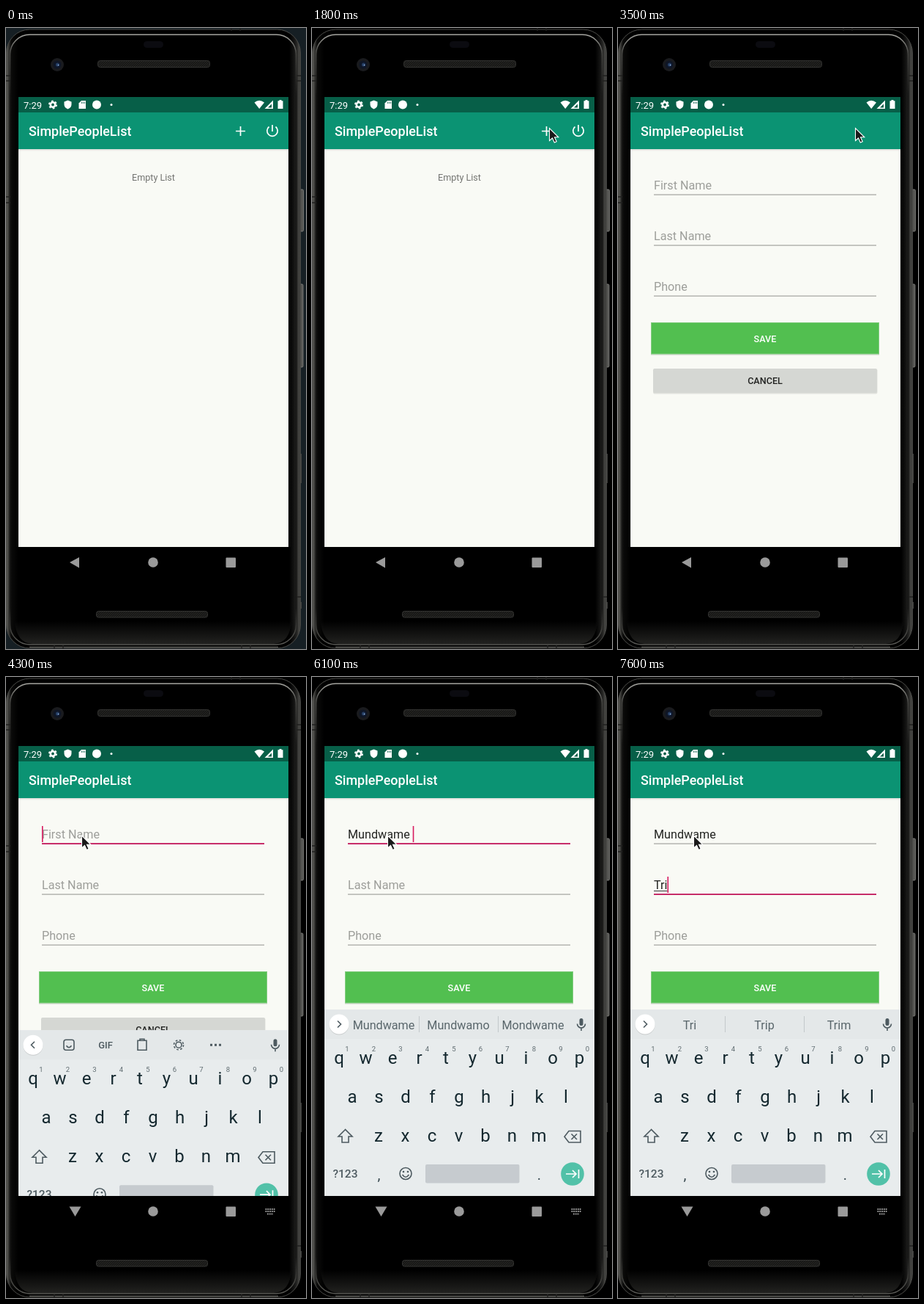
Recreate the animation shown at these times as an HTML page. Size 410 by 846 pixels, loop 8000 ms.

```html
<!DOCTYPE html>
<html lang="en">
<head>
<meta charset="utf-8">
<title>Contact form on a phone</title>
<style>
html, body { margin: 0; width: 410px; height: 846px; overflow: hidden; background: #000; }
svg { display: block; font-family: Roboto, sans-serif; }
text { white-space: pre; }
.mid { text-anchor: middle; }
.field { font-size: 16.16px; fill: #222321; }
.hint { fill: #9d9e9a; }
.line { fill: none; stroke: #fff; stroke-width: 1.7; }
.key { fill: none; stroke: #4d5a60; stroke-width: 1.6; }
</style>
</head>
<body>
<svg width="410" height="846" viewBox="0 0 410 846">
  <defs>
    <linearGradient id="side">
      <stop offset="0" stop-color="#62625e"/><stop offset=".008" stop-color="#383835"/>
      <stop offset=".016" stop-color="#0b0b0a"/><stop offset=".04" stop-color="#000"/>
      <stop offset=".962" stop-color="#000"/><stop offset=".978" stop-color="#141413"/>
      <stop offset=".988" stop-color="#282826"/><stop offset=".996" stop-color="#4b4b48"/>
      <stop offset="1" stop-color="#20201f"/>
    </linearGradient>
    <linearGradient id="rim" x2="0" y2="1">
      <stop offset="0" stop-color="#a5a5a0"/><stop offset=".03" stop-color="#454542"/>
      <stop offset=".1" stop-color="#141413"/><stop offset=".94" stop-color="#141413"/>
      <stop offset="1" stop-color="#5a5a56"/>
    </linearGradient>
    <linearGradient id="shade" x2="0" y2="1">
      <stop offset="0" stop-opacity=".12"/><stop offset="1" stop-opacity="0"/>
    </linearGradient>
    <linearGradient id="glow" x2="0" y2="1">
      <stop offset="0" stop-color="#222220" stop-opacity="0"/><stop offset="1" stop-color="#222220"/>
    </linearGradient>
    <pattern id="mesh" width="3" height="3" patternUnits="userSpaceOnUse">
      <rect width="3" height="3" fill="#171716"/><path d="M0 3L3 0" stroke="#2c2c2a" stroke-width=".8"/>
    </pattern>
    <clipPath id="screen"><rect x="17" y="94" width="369" height="656"/></clipPath>
    <clipPath id="page"><rect x="17" y="94" width="369" height="613"/></clipPath>
    <g id="base">
      <rect x="17" y="94" width="369" height="656"/>
      <rect x="17" y="94" width="369" height="613" fill="#f9faf5"/>
      <rect x="17" y="165" width="369" height="3" fill="url(#shade)"/>
      <rect x="17" y="94" width="369" height="21" fill="#075f48"/>
      <rect x="17" y="115" width="369" height="50" fill="#0b9373"/>
      <text x="31" y="147" font-size="17.96" font-weight="500" fill="#fff">SimplePeopleList</text>
    </g>
  </defs>

  <!-- phone body -->
  <rect id="desk" width="410" height="846"/>
  <g fill="#555552" stroke="#8a8a86" stroke-width=".8">
    <rect x="400" y="220" width="6.5" height="57" rx="1.5"/>
    <rect x="400" y="349" width="6" height="113" rx="1.5"/>
  </g>
  <path d="M403.500 580V620M403.500 782V791" stroke="#454542"/>
  <rect x=".5" y="2" width="402" height="843" rx="32" fill="url(#side)" stroke="#4b4b48"/>
  <path d="M12 808H390Q388 838 366 839H36Q14 838 12 808Z" fill="url(#glow)"/>
  <rect x="5.500" y="9" width="391" height="831" rx="27" fill="none" stroke="url(#rim)" stroke-width="1.500"/>
  <path d="M32 843.500H372" stroke="#5d5d59" stroke-width="1.500"/>
  <path d="M0 65H6M0 72H6M0 230H6M0 238H6M397 65H403M397 72H403M397 775H403M308 0V4M320 0V4M66 841V846M78 841V846M322 841V846M334 841V846" stroke="#20201f" stroke-width="1.500"/>
  <rect x="188" y="18" width="27" height="9" rx="4.500" fill="#0b0b10"/>
  <circle cx="70" cy="50" r="9" fill="#1a1b1e"/><circle cx="70" cy="50" r="5.500" fill="#0f1626"/>
  <circle cx="70.500" cy="50" r="2.500" fill="#263f66"/><circle cx="71.500" cy="50.500" r=".8" fill="#a9c4e8"/>
  <g fill="url(#mesh)" stroke="#333331">
    <rect x="125.500" y="44.500" width="153" height="9" rx="3"/>
    <rect x="123.500" y="794.500" width="152" height="8.500" rx="3"/>
  </g>

  <g clip-path="url(#screen)">
    <g id="list">
      <use href="#base"/>
      <circle id="ripple" cx="320.500" cy="140" fill="#fff" fill-opacity=".21"/>
      <path class="line" d="M314 140.500H327M320.500 134V147"/>
      <path class="line" d="M364 132V141M359.500 134.500A7.200 7.200 0 1 0 368.500 134.500"/>
      <text class="mid" x="201.500" y="208" font-size="12.600" fill="#737471">Empty List</text>
    </g>
    <g id="form">
      <use href="#base"/>
      <g id="fields"></g>
      <rect x="45" y="402" width="312" height="44" fill="#000" opacity=".1"/>
      <rect x="45.500" y="401.500" width="311" height="42.500" fill="#52bf50" stroke="#7fcb7d"/>
      <rect x="48" y="464.500" width="306.500" height="34" rx="2" fill="#000" opacity=".1"/>
      <rect x="48" y="464" width="306" height="33" rx="2" fill="#d5d7d3"/>
      <g class="mid" font-size="12.600" font-weight="500">
        <text x="201" y="427.500" fill="#fff">SAVE</text>
        <text x="201" y="485" fill="#232422">CANCEL</text>
      </g>
    </g>
  </g>

  <g clip-path="url(#page)">
    <g id="keyboard">
      <rect x="17" y="453" width="369" height="254" fill="#e8eced"/>
      <rect x="17" y="453" width="369" height="40" fill="#e4e8e9"/>
      <circle cx="37" cy="474" r="13.500" fill="#000" opacity=".12"/>
      <circle cx="37" cy="473" r="13.500" fill="#fff"/>
      <path id="chevron" d="M35 468.500L39.500 473L35 477.500" class="key"/>
      <g id="words" class="mid" font-size="16.160" fill="#59666b">
        <path d="M146.500 462V484M254.500 462V484" stroke="#c3c9cb"/>
        <text x="98" y="479.500"></text><text x="200" y="479.500"></text><text x="302" y="479.500"></text>
      </g>
      <g id="tools" class="key">
        <rect x="79" y="466" width="14" height="14" rx="3"/><path d="M82.500 474Q86 479 89.500 474"/>
        <text class="mid" x="136" y="478" font-size="13" font-weight="500" fill="#4d5a60" stroke="none">GIF</text>
        <path d="M180 467H192V480H180ZM183 467V465H189V467"/>
        <circle cx="236" cy="473" r="4"/><circle cx="236" cy="473" r="6.500" stroke-dasharray="2.600 2.505"/>
        <path d="M279 473H282M285 473H288M291 473H294" stroke-width="3"/>
      </g>
      <rect x="365.500" y="465" width="5" height="10" rx="2.500" fill="#4d5a60"/>
      <path class="key" d="M362.500 472.500A5.500 5.500 0 0 0 373.500 472.500M368 478V482"/>
      <g id="keys" class="mid" fill="#14282f"></g>
      <path class="key" d="M45.500 616.500L36 626H41V634H50V626H55Z"/>
      <path class="key" d="M351 618.500H367V634H351L345 626.200ZM354.500 622.500L362 630M362 622.500L354.500 630"/>
      <g class="mid" fill="#37474f">
        <text x="45.500" y="682" font-size="15.500" font-weight="500" fill="#4d5a60">?123</text>
        <text x="91.500" y="685" font-size="20">,</text><text x="310.500" y="685" font-size="20">.</text>
      </g>
      <circle class="key" cx="128" cy="676.500" r="8"/><path class="key" d="M123.500 678Q128 684.500 132.500 678"/>
      <circle cx="125" cy="674" r="1.300" fill="#4d5a60"/><circle cx="131" cy="674" r="1.300" fill="#4d5a60"/>
      <rect x="155" y="664" width="128.500" height="25.500" rx="2" fill="#c6cbcf"/>
      <circle cx="356" cy="677" r="15.800" fill="#51c1a8"/>
      <path class="line" d="M347 677H361M356 672L361 677L356 682M364.500 671V683"/>
    </g>
  </g>

  <!-- status icons -->
  <g fill="#fff">
    <text x="24" y="109.500" font-size="13">7:29</text>
    <circle cx="64" cy="104.500" r="3.200" fill="none" stroke="#fff" stroke-width="2.600"/>
    <circle cx="64" cy="104.500" r="5" fill="none" stroke="#fff" stroke-width="2" stroke-dasharray="2.600 2.636"/>
    <path d="M84.500 98.500L89.500 100.500V104Q89.500 108.500 84.500 110.500Q79.500 108.500 79.500 104V100.500Z"/>
    <path d="M103 99H109V110H99.500V102.500Z"/>
    <path d="M103.500 100.500V103M105.500 100.500V103M107.500 100.500V103" stroke="#075f48" stroke-width=".8"/>
    <circle cx="124" cy="104.500" r="6"/>
    <circle cx="144" cy="104.500" r="1.500"/>
    <path d="M339.500 101.500Q346 96 353 101.500L346.200 110Z"/>
    <path d="M365 98.500V110H353.500Z"/><path d="M363 103.500V108.500H358Z" fill="#075f48"/>
    <path d="M373.500 98H376.500V99.200H378.500V110H371.500V99.200H373.500Z"/>
  </g>
  <!-- navigation buttons -->
  <g fill="#9a9a9a">
    <path id="back" d="M87 728L100 721V735.500Z"/>
    <path id="down" d="M86.500 721.500H102.500L94.500 735Z"/>
    <circle cx="201" cy="728" r="6.800"/>
    <rect x="300.500" y="721.500" width="13.500" height="13.500" rx="1"/>
    <path id="switch" d="M354.500 725H368M354.500 728H368M357 731.500H365.500" stroke="#9a9a9a" stroke-width="1.800" stroke-dasharray="1.800 1"/>
  </g>
  <path id="mouse" d="M0 0V17L4 13.500L6.800 19.500L9.700 18.200L7 12.300H12.300Z" fill="#1a1a1a" stroke="#fff" stroke-width="1.100"/>
</svg>
<script>
const $ = id => document.getElementById(id);
const show = (el, on) => el.style.display = on ? '' : 'none';
const part = (t, from, to) => Math.min(1, Math.max(0, (t - from) / (to - from)));
const smooth = p => p * p * (3 - 2 * p);
const easeOut = p => 1 - (1 - p) ** 4;
const mix = (a, b, p) => a + (b - a) * p;
const zoom = s => `translate(201.5 422) scale(${s}) translate(-201.5 -422)`;

const LOOP = 8000, STEP = 100, NAME = 'Mundwame';

// time, first name, last name, suggestions (empty: toolbar icons)
const typing = [
  [0, '', '', ''],
  [4900, 'M', '', 'M My Maybe'],
  [5100, 'Mu', '', 'M My Maybe'],
  [5200, 'Mu', '', 'Mu Must Much'],
  [5400, 'Mun', '', 'Mu Must Much'],
  [5500, 'Mun', '', `Mun ${NAME} Munch`],
  [5700, 'Mundw', '', `Mundw ${NAME} Mundwamo`],
  [5800, 'Mundwam', '', `Mundwam ${NAME} Mundwamo`],
  [5900, NAME, '', `${NAME} Mundwamo Mondwame`],
  [6100, NAME + ' ', '', `${NAME} Mundwamo Mondwame`],
  [6200, NAME + ' ', '', 'and is the'],
  [6800, NAME + ' ', '', ''],
  [7100, NAME + ' ', 'T', 'T The To'],
  [7300, NAME + ' ', 'Tr', 'Tr Try True'],
  [7600, NAME + ' ', 'Tri', 'Tri Trip Trim']
];

$('fields').innerHTML = ['First Name', 'Last Name', 'Phone'].map((hint, i) => `
  <g transform="translate(49 ${220 + 69 * i})">
    <text class="field hint">${hint}</text><text class="field"></text>
    <rect class="under" y="2" height="1" fill="#333"/>
    <rect class="rule" width="304"/>
    <rect class="caret" y="-17" width="1.6" height="22" fill="#d81b60"/>
  </g>`).join('');

$('keys').innerHTML = [['qwertyuiop', 37, 527], ['asdfghjkl', 55, 579.5], ['zxcvbnm', 91, 632.5]]
  .map(([row, x0, y], r) => [...row].map((c, i) => {
    const x = x0 + 36.5 * i;
    const digit = r ? '' : `<text x="${x + 11}" y="509.5" font-size="9.5" fill="#5f6b70">${(i + 1) % 10}</text>`;
    return `<text x="${x}" y="${y}" font-size="24">${c}</text>` + digit;
  }).join('')).join('');

const fields = [...$('fields').children];
const words = $('words').querySelectorAll('text');

function drawField(box, value, focused, composing, caretOn) {
  const [hint, text, under, rule, caret] = box.children;
  show(hint, !value);
  text.textContent = value;
  const width = value ? text.getComputedTextLength() : 0;
  under.setAttribute('width', composing ? width : 0);
  rule.setAttribute('y', focused ? 6.2 : 6.5);
  rule.setAttribute('height', focused ? 1.8 : 1.2);
  rule.setAttribute('fill', focused ? '#c2185b' : '#a3a49f');
  caret.setAttribute('x', width);
  show(caret, focused && caretOn);
}

function draw(t) {
  const fade = part(t, 0, 900);
  $('desk').setAttribute('fill', `rgb(${[22, 31, 36].map(c => Math.round(c * (1 - fade)))})`);

  // opening the form
  const opening = t >= 3300;
  show($('list'), t < 3600);
  show($('form'), opening);
  $('list').setAttribute('transform', zoom(1 + .07 * easeOut(part(t, 3190, 3590))));
  $('form').setAttribute('transform', zoom(t >= 3500 ? 1 : mix(.85, 1, easeOut(part(t, 3200, 3500)))));
  $('ripple').setAttribute('r', t < 2900 ? 0 : mix(8, 18, part(t, 2900, 3100)));

  // typing
  const [, first, last, hints] = typing.findLast(s => s[0] <= t);
  const focus = t < 4100 ? -1 : t < 6700 ? 0 : 1;
  const caretOn = t < 4600 || t >= 4900;
  [first, last, ''].forEach((value, i) =>
    drawField(fields[i], value, i === focus, i === focus && !value.endsWith(' '), caretOn));

  // keyboard
  const typingOn = t >= 4200;
  show($('keyboard'), typingOn);
  $('keyboard').setAttribute('transform', `translate(0 ${254 * (1 - part(t, 4100, 4400)) ** 2})`);
  show($('words'), hints);
  show($('tools'), !hints);
  $('chevron').setAttribute('transform', hints ? '' : 'rotate(180 37 473)');
  hints.split(' ').forEach((w, i) => words[i].textContent = w);
  show($('back'), !typingOn);
  show($('down'), typingOn);
  show($('switch'), typingOn);

  // pointer
  const enter = smooth(part(t, 1000, 1700)), move = smooth(part(t, 3600, 4000));
  const x = mix(mix(412, 324.5, enter), 103.5, move);
  const y = mix(mix(300, 136.5, enter), 216, move);
  $('mouse').setAttribute('transform', `translate(${x} ${y})`);
}

const start = performance.now();
function tick() {
  const t = (performance.now() - start) % LOOP;
  draw(Math.floor(t / STEP) * STEP);
  requestAnimationFrame(tick);
}
tick();
</script>
</body>
</html>
```
